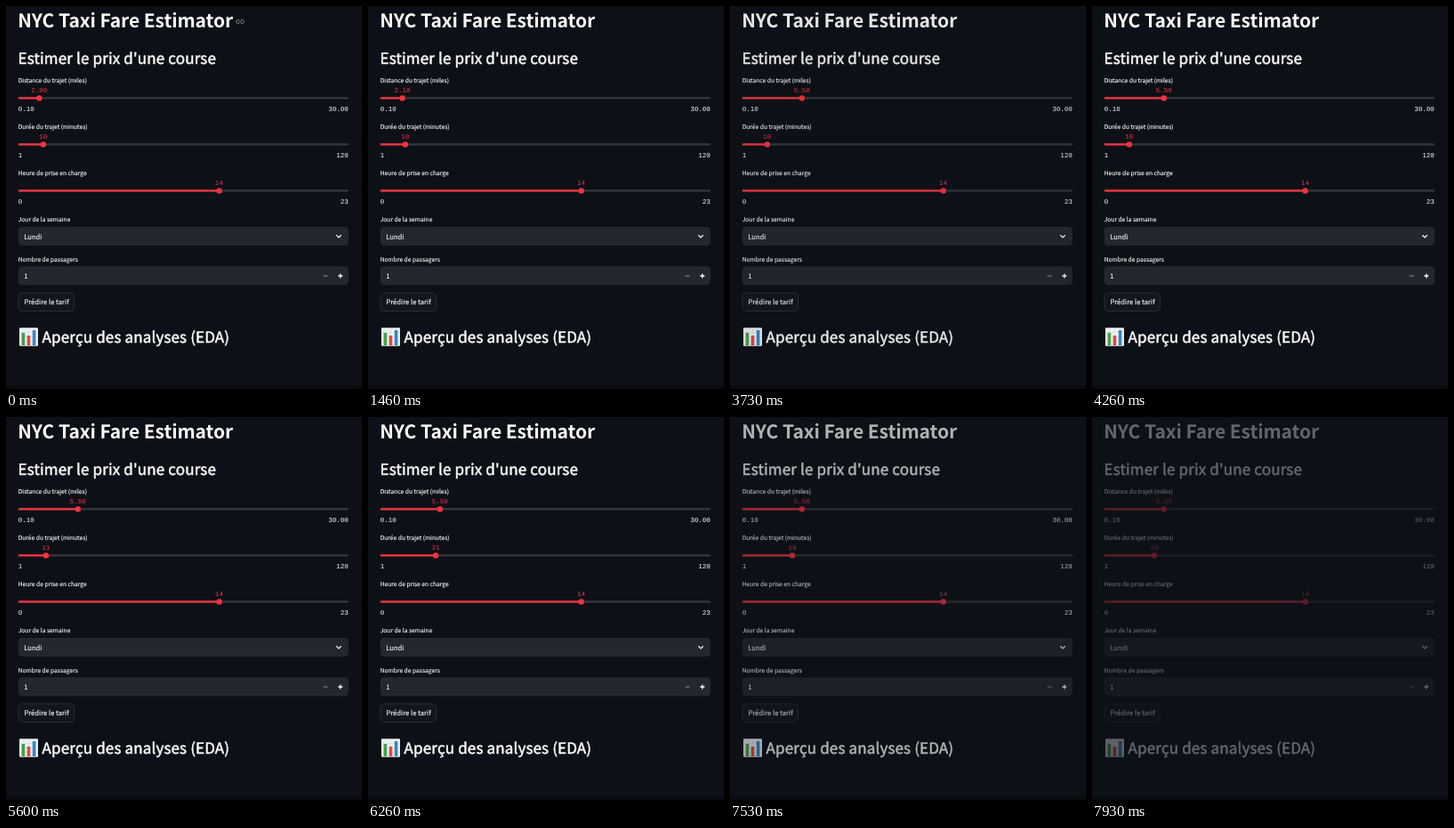
Write an HTML page that moves like this. It is 400x430 px and loops after 8 s.

```html
<!DOCTYPE html>
<html lang="fr">
<head>
<meta charset="utf-8">
<title>NYC Taxi Fare Estimator</title>
<style>
  html, body { margin: 0; width: 100%; height: 100%; overflow: hidden; background: #0d1117; }
  svg { display: block; width: 400px; height: 430px; }
  text {
    font-family: "Noto Sans CJK JP", "Noto Sans CJK SC", "Noto Sans CJK", "Open Sans", sans-serif;
    fill: #fafafa;
    text-rendering: geometricPrecision;
  }
  .title { font-size: 21px; font-weight: 700; letter-spacing: -.08px; }
  .heading { font-size: 17px; letter-spacing: .15px; stroke: #fafafa; stroke-width: .5px; }
  .label { font-size: 6.7px; stroke: #fafafa; stroke-width: .12px; }
  .body { font-size: 7.65px; stroke: #fafafa; stroke-width: .12px; }
  .mono { font: 7.5px "Liberation Mono", monospace; }
  .value { fill: #f5323f; text-anchor: middle; }
  .end { text-anchor: end; }
  .rail { fill: #36383e; }
  .accent { fill: #f5323f; }
  .field { fill: #25272e; }
  .button { fill: #12161d; stroke: #3b3e45; stroke-width: .6px; }
  .icon { fill: none; stroke: #fafafa; stroke-width: 1.3px; }
  .muted { stroke: #74767b; }
  .link { fill: none; stroke: #84868b; stroke-width: 1px; }
</style>
</head>
<body>
<svg viewBox="0 0 400 430">
  <defs>
    <path id="chain" d="M-.8-2H-2.4a2 2 0 0 0 0 4H-.8M.8-2H2.4a2 2 0 0 1 0 4H.8M-1.8 0H1.8"/>
  </defs>
  <rect y="426" width="400" height="4" fill="#080b0f"/>
  <g id="app">
    <text class="title" x="13.2" y="23.8">NYC Taxi Fare Estimator</text>
    <use id="titleLink" class="link" href="#chain" x="263" y="17.5"/>
    <text class="heading" x="13.5" y="64.5">Estimer le prix d'une course</text>
    <use id="headingLink" class="link" href="#chain" x="244" y="60.5"/>

    <g id="sliders"></g>

    <text class="label" x="13.7" y="242.4">Jour de la semaine</text>
    <rect class="field" x="13.8" y="248" width="371" height="21" rx="4.2"/>
    <text class="body" x="20.2" y="261.8">Lundi</text>
    <path class="icon" d="M371.2 257.2l2.7 2.7 2.7-2.7"/>

    <text class="label" x="13.7" y="286.5">Nombre de passagers</text>
    <rect class="field" x="13.8" y="292.2" width="371" height="21" rx="4.2"/>
    <text class="body" x="20.2" y="305.8">1</text>
    <path class="icon muted" d="M356.5 303h5"/>
    <path class="icon" d="M373.2 303h5M375.7 300.5v5"/>

    <rect class="button" x="14" y="322" width="62.5" height="20.5" rx="4.2"/>
    <text class="body" x="20.4" y="334.9">Prédire le tarif</text>

    <rect x="15" y="361.3" width="21" height="20.4" rx="1" fill="#eef1f2"/>
    <path d="M15 366.4h21M15 371.5h21M15 376.6h21M20.2 361.3v20.4M25.5 361.3v20.4M30.8 361.3v20.4" stroke="#c9d3d8" stroke-width=".5"/>
    <rect x="17.6" y="367" width="3.6" height="14" fill="#3fa24b"/>
    <rect x="23.7" y="370" width="3.6" height="11" fill="#e5483f"/>
    <rect x="29.8" y="364" width="3.6" height="17" fill="#3187c5"/>
    <text class="heading" x="40.6" y="377.9">Aperçu des analyses (EDA)</text>
  </g>
</svg>
<script>
const LOOP = 8000;
const LEFT = 13.8, WIDTH = 371;
const byId = id => document.getElementById(id);

// Each step is [time in ms, value].
const sliders = [
  { label: "Distance du trajet (miles)", y: 103.4, min: 0.1, max: 30, digits: 2, steps: [
    [0, 2], [1400, 2.1], [1470, 2.3], [1530, 2.6], [1600, 2.9], [1670, 3.2], [1730, 3.5],
    [1800, 3.8], [1870, 4.1], [1930, 4.4], [2000, 4.6], [2070, 4.8], [2200, 4.9],
    [2260, 5], [2330, 5.1], [2400, 5.2], [2460, 5.3], [2530, 5.4], [2660, 5.5]] },
  { label: "Durée du trajet (minutes)", y: 155.4, min: 1, max: 120, digits: 0, steps: [
    [0, 10], [5600, 11], [5670, 12], [5730, 13], [5800, 15], [5870, 16], [5930, 18],
    [6000, 19], [6130, 20], [6260, 21], [6660, 20], [7400, 19]] },
  { label: "Heure de prise en charge", y: 207.4, min: 0, max: 23, digits: 0, steps: [[0, 14]] },
];

function add(parent, tag, attrs, content = "") {
  const el = document.createElementNS("http://www.w3.org/2000/svg", tag);
  for (const name in attrs) el.setAttribute(name, attrs[name]);
  el.textContent = content;
  return parent.appendChild(el);
}

function buildSlider(s) {
  const g = add(byId("sliders"), "g", {});
  const bar = { x: LEFT, y: s.y - 1.05, height: 2.1, rx: 1 };
  add(g, "text", { class: "label", x: 13.7, y: s.y - 17 }, s.label);
  add(g, "rect", { ...bar, class: "rail", width: WIDTH });
  s.fill = add(g, "rect", { ...bar, class: "accent" });
  s.thumb = add(g, "circle", { class: "accent", cy: s.y, r: 3.2 });
  s.value = add(g, "text", { class: "mono value", y: s.y - 6.5 });
  add(g, "text", { class: "mono", x: 13.7, y: s.y + 14.4 }, s.min.toFixed(s.digits));
  add(g, "text", { class: "mono end", x: 384.8, y: s.y + 14.4 }, s.max.toFixed(s.digits));
}

function drawSlider(s, t) {
  const value = s.steps.findLast(([time]) => time <= t)[1];
  const offset = WIDTH * (value - s.min) / (s.max - s.min);
  s.fill.setAttribute("width", offset);
  s.thumb.setAttribute("cx", LEFT + offset);
  s.value.setAttribute("x", LEFT + offset);
  s.value.textContent = value.toFixed(s.digits);
}

// The page dims while it recomputes, then snaps back.
const fades = [[3430, 4260], [6880, LOOP]];

function opacityAt(t) {
  const fade = fades.find(([from, to]) => t >= from && t < to);
  if (!fade) return 1;
  const progress = Math.min(1, (t - fade[0]) / 1000);
  return 1 - 0.64 * progress ** 1.7;
}

const show = (id, visible) => byId(id).setAttribute("visibility", visible ? "visible" : "hidden");

function draw(t) {
  sliders.forEach(s => drawSlider(s, t));
  show("titleLink", t < 130);
  show("headingLink", t >= 530 && t < 600);
  byId("app").setAttribute("opacity", opacityAt(t));
}

sliders.forEach(buildSlider);
const start = performance.now();
function tick() {
  draw((performance.now() - start) % LOOP);
  requestAnimationFrame(tick);
}
tick();
</script>
</body>
</html>
```
